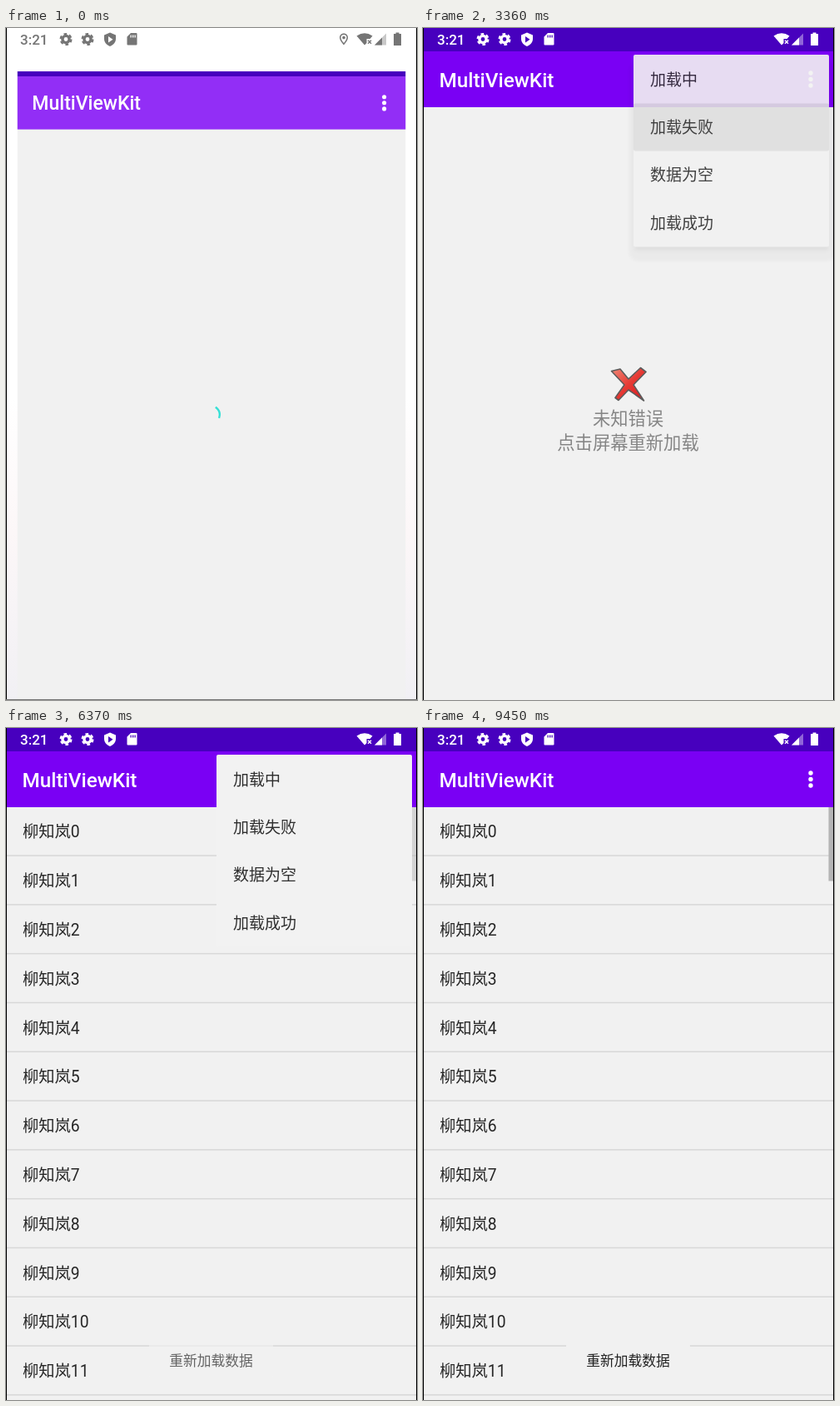
Animation of 494x806 px, one loop 9.52 s. Source, as an HTML page:

```html
<!DOCTYPE html>
<html lang="zh">
<head>
<meta charset="utf-8">
<title>MultiViewKit</title>
<style>
  html, body { margin: 0; width: 100%; height: 100%; overflow: hidden; background: #fff; }
  svg { display: block; width: 494px; height: 806px; }
  text { font-family: Roboto, "Noto Sans CJK SC", "Noto Sans CJK", sans-serif; white-space: pre; }
  .zh { font-family: "Noto Sans CJK SC", "Noto Sans CJK", Roboto, sans-serif; font-weight: 300; }
  .num { font-family: Roboto, sans-serif; font-weight: 400; }
</style>
</head>
<body>
<svg viewBox="0 0 494 806" xmlns="http://www.w3.org/2000/svg">
  <defs>
    <linearGradient id="desk" x1="0" y1="0" x2="0" y2="1">
      <stop offset=".55" stop-color="#fff"/>
      <stop offset=".75" stop-color="#fcf7f8"/>
      <stop offset="1" stop-color="#f1f0f4"/>
    </linearGradient>
    <linearGradient id="red" x1="0" y1="0" x2="1" y2="1">
      <stop offset="0" stop-color="#f08a78"/>
      <stop offset=".5" stop-color="#e63a34"/>
      <stop offset="1" stop-color="#d8141c"/>
    </linearGradient>
    <filter id="soft" x="-20%" y="-20%" width="140%" height="140%"><feGaussianBlur stdDeviation="2.5"/></filter>
    <clipPath id="windowClip"><rect id="windowRect" width="494" height="806"/></clipPath>
    <clipPath id="menuClip"><rect id="menuRect" x="235" y="20" width="259"/></clipPath>
    <clipPath id="itemClip"><rect id="itemRect" x="253" width="235" height="57" rx="2"/></clipPath>
  </defs>

  <rect width="494" height="806" fill="url(#desk)"/>
  <g clip-path="url(#windowClip)">
    <g id="window">
      <rect x="1" width="492" height="870" fill="#f1f1f1"/>

      <g id="list"><g id="rows"></g><rect id="bar" x="487.5" y="95" width="5.5" height="88.5" fill="#b4b4b4"/></g>

      <g id="error" fill="#858585" text-anchor="middle">
        <path d="M226.5 411.5L237 409L247 421L261.5 407.5L268 412.5L253 428L265.5 447L247 434L235 446.5L231 443.5L242 428Z"
          fill="url(#red)" stroke="#5c5c5c" stroke-width="1.6" stroke-linejoin="round"/>
      </g>
      <g id="empty" fill="#858585" text-anchor="middle"></g>
      <path id="spinner" fill="none" stroke="#36e0d6" stroke-width="2.5" stroke-linecap="square"/>

      <rect x="1" width="492" height="28" fill="#4700be"/>
      <rect x="1" y="28" width="492" height="67" fill="#7a00f4"/>
      <rect id="tint" x="1" y="28" width="492" height="67" fill="#fff"/>
      <text x="19.5" y="70.5" font-size="24.3" font-weight="500" fill="#fff">MultiViewKit</text>
      <circle id="press" cx="466" cy="58" fill="#fff"/>
      <g fill="#fff"><circle cx="466" cy="54" r="2.7"/><circle cx="466" cy="61.5" r="2.7"/><circle cx="466" cy="69" r="2.7"/></g>
    </g>
  </g>

  <g id="status">
    <text x="17" y="20" font-size="17" font-weight="500">3:21</text>
    <g id="gears" fill="none" stroke="currentColor"></g>
    <g fill-rule="evenodd">
      <path d="M125 5.5l7 3v4.5c0 4-3 7.5-7 9c-4-1.500-7-5-7-9v-4.500zM123 10v7.500l5.500-3.700z"/>
      <path d="M150 6H156.500Q157.500 6 157.500 7V19.500Q157.500 20.500 156.500 20.500H146.500Q145.500 20.500 145.500 19.500V10.500ZM149.500 8.500v3h1.300v-3zM152 8.500v3h1.300v-3zM154.500 8.500v3h1.300v-3z"/>
      <path id="pin" d="M406 6.500c-3 0-5 2.200-5 5c0 3.600 5 9 5 9s5-5.400 5-9c0-2.800-2-5-5-5zM406 8c2.200 0 3.500 1.500 3.500 3.500c0 2.200-2.200 5-3.500 6.600c-1.300-1.600-3.500-4.400-3.500-6.600c0-2 1.300-3.500 3.500-3.500zM406 9.700a1.800 1.800 0 1 0 .01 0z"/>
    </g>
    <path d="M421.500 9.500Q431 3 440.500 9.500L437.500 13H433.500V18L431 20.500Z"/>
    <path d="M435 14.800l4 4m0-4l-4 4" stroke="currentColor" stroke-width="1.4"/>
    <path d="M457 6.500V20.500H443Z" opacity=".4"/>
    <path d="M452 11.500V20.500H443Z"/>
    <path d="M468.500 5.500h4v1.500h2.500v14h-9v-14h2.500z"/>
  </g>

  <g id="menu">
    <g id="shadow">
      <rect x="247" y="40" width="250" height="240" rx="12" fill="#000" opacity=".03" filter="url(#soft)"/>
      <rect x="254" y="36" width="234" height="231" rx="3" fill="#000" opacity=".05" filter="url(#soft)"/>
    </g>
    <g clip-path="url(#menuClip)">
      <rect x="253" y="32" width="235" height="230.500" rx="2" fill="#f2f2f2"/>
      <g clip-path="url(#itemClip)"><circle id="touch" cx="370" fill="#dfdfdf"/></g>
      <g id="items" fill="#2f2f2f"></g>
    </g>
  </g>

  <g id="toast">
    <rect x="172" y="738" width="149" height="41" rx="3" fill="#f1f1f1"/>
  </g>
  <rect width="1" height="806"/>
  <rect x="493" width="1" height="806"/>
  <rect id="foot" y="805" width="494" height="1" fill="#777"/>
</svg>

<script>
const LOOP = 9520, STEP = 70;
const NS = "http://www.w3.org/2000/svg";
const $ = id => document.getElementById(id);
const clamp = v => Math.max(0, Math.min(1, v));
const ramp = (t, from, span) => clamp((t - from) / span);
const easeOut = p => 1 - (1 - p) * (1 - p);

function add(parent, tag, attrs, content = "") {
  const el = document.createElementNS(NS, tag);
  set(el, attrs);
  el.textContent = content;
  return parent.appendChild(el);
}
function set(el, attrs) {
  for (const key in attrs) el.setAttribute(key, attrs[key]);
}
function show(el, opacity) {
  el.style.display = opacity > 0 ? "" : "none";
  el.style.opacity = opacity;
}
// Chinese text centred vertically on cy
function label(id, content, x, cy, size, attrs = {}) {
  return add($(id), "text", { class: "zh", x, y: cy + size * 0.38, "font-size": size, ...attrs }, content);
}

for (let i = 0; i < 12; i++) {
  const row = label("rows", "柳知岚", 20, 124 + 58.8 * i, 19.3, { fill: "#262626" });
  add(row, "tspan", { class: "num" }, i);
  add($("rows"), "rect", { x: 1, y: 152.3 + 58.8 * i, width: 492, height: 1.5, fill: "#d8d8d8" });
}
label("error", "未知错误", 246.5, 467.5, 21.3);
label("error", "点击屏幕重新加载", 246.5, 496.5, 21.3);
label("empty", "暂无数据,点击屏幕重新加载", 246.5, 456, 21.4);
["加载中", "加载失败", "数据为空", "加载成功"].forEach((s, i) => label("items", s, 273, 61.5 + 57.3 * i, 19));
label("toast", "重新加载数据", 246.5, 758.5, 16.8, { fill: "#222", "text-anchor": "middle" });
for (const cx of [72, 98]) {
  add($("gears"), "circle", { cx, cy: 13.5, r: 4.1, "stroke-width": 3.4 });
  add($("gears"), "circle", { cx, cy: 13.5, r: 6.4, "stroke-width": 2.2, "stroke-dasharray": "3.7 3" });
}

const views = [
  [0, "load", -170], [910, "list"], [3150, "error"],
  [4060, "load", 4130], [5040, "list"], [6860, "empty"],
  [7630, "load", 7700], [8610, "list"]
];
const menus = [
  { press: 1600, item: 1, touch: 2400, close: 3150 },
  { press: 5745, item: 2, touch: 6390, close: 6860 }
];

// Trim curve of the indeterminate ring: eases over the first half, then holds
function trim(p, a, b) {
  if (p >= 0.5) return 1;
  if (p <= 0) return 0;
  let lo = 0, hi = 1, u = 0;
  for (let i = 0; i < 24; i++) {
    u = (lo + hi) / 2;
    const v = 1 - u;
    if (3 * v * v * u * a + 3 * v * u * u * b + u * u * u * 0.5 < p) lo = u; else hi = u;
  }
  return 3 * (1 - u) * u * u + u * u * u;
}

function drawSpinner(age) {
  const p = age / 1333 % 1;
  const tail = 0.75 * trim(p - 0.5, 0.2, 0.1), head = 0.75 * trim(p, 0.2, 0.1);
  const base = -0.25 + 0.25 * p + age / 2222;
  const sweep = Math.max(0.01, head - tail);
  const at = turn => {
    const a = turn * 2 * Math.PI;
    return `${246 + 11.3 * Math.cos(a)} ${456 + 11.3 * Math.sin(a)}`;
  };
  $("spinner").setAttribute("d",
    `M${at(base + tail)}A11.3 11.3 0 ${sweep > 0.5 ? 1 : 0} 1 ${at(base + tail + sweep)}`);
}

function drawLaunch(t) {
  const k = easeOut(ramp(t, 0, 280)), rest = 1 - k;
  const scale = 1 - 0.052 * rest;
  $("window").setAttribute("transform", `translate(${247 * (1 - scale)} ${31.5 * rest}) scale(${scale})`);
  $("windowRect").setAttribute("y", 52 * rest);
  show($("tint"), 0.18 * rest);
  show($("foot"), rest);
  const tone = Math.round(117 + 138 * k);
  set($("status"), { fill: `rgb(${tone},${tone},${tone})`, color: `rgb(${tone},${tone},${tone})` });
  show($("pin"), t < 910 ? 1 : 0);
}

function drawMenu(t) {
  const m = t < 4500 ? menus[0] : menus[1];
  const open = m.press + 350;
  const grow = easeOut(ramp(t, m.press, 200));
  $("press").setAttribute("r", 20.5 * grow);
  show($("press"), t > m.press ? 0.25 * (1 - ramp(t, open, 250)) : 0);

  const enter = ramp(t, open, 260);
  const leave = ramp(t, m.close + 60, 500);
  show($("menu"), enter * (1 - leave * leave));
  show($("shadow"), t >= m.close ? 1 : 0);
  $("menuRect").setAttribute("height", 70 + 180 * easeOut(enter));

  const top = 33.3 + 57.3 * m.item;
  $("itemRect").setAttribute("y", top);
  const spread = ramp(t, m.touch, 260);
  set($("touch"), { cy: top + 28, r: 125 * easeOut(spread) });
  show($("touch"), Math.min(1, spread * 2));
}

function draw(t) {
  const [start, kind, spinStart] = views.filter(v => v[0] <= t).pop();
  for (const id of ["list", "error", "empty"]) show($(id), kind === id ? 1 : 0);
  show($("spinner"), kind === "load" ? 1 : 0);
  if (kind === "load") drawSpinner(Math.max(0, t - spinStart));
  if (kind === "list") show($("bar"), 1 - ramp(t, start + 1200, 250));
  drawLaunch(t);
  drawMenu(t);
  const shown = t < 7000 ? 4100 : 7670;
  show($("toast"), ramp(t, shown, 500) * (1 - ramp(t, shown + 2110, 500)));
}

let origin;
function tick(now) {
  origin ??= now;
  draw(Math.floor((now - origin) % LOOP / STEP) * STEP);
  requestAnimationFrame(tick);
}
draw(0);
requestAnimationFrame(tick);
</script>
</body>
</html>
```
